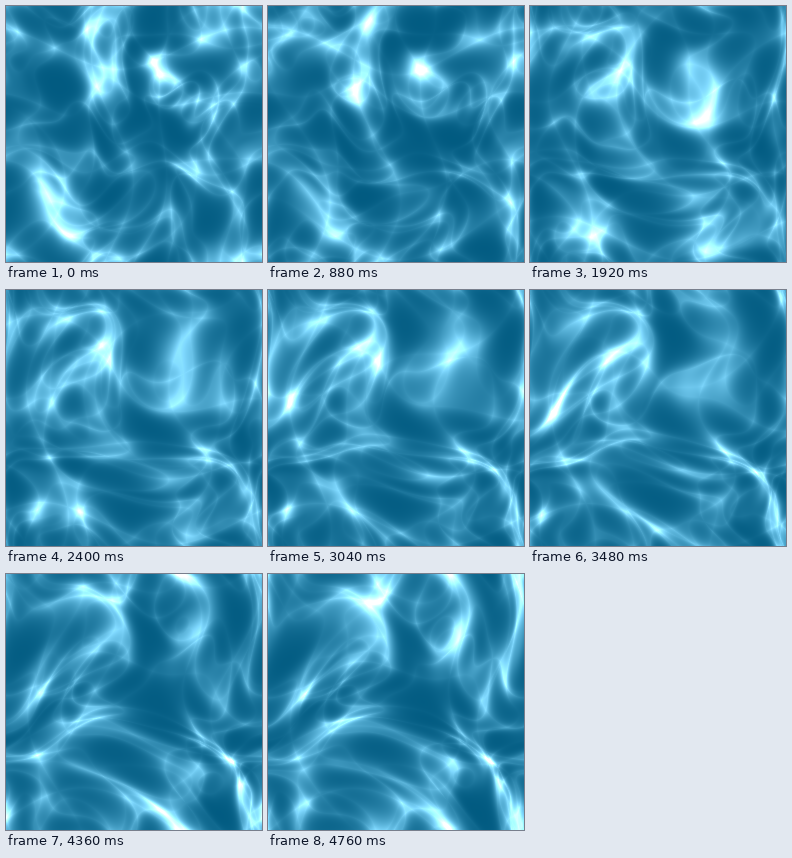
Recreate the animation shown at these times as an HTML page with a canvas. Size 256 px wide and 256 px high, loop 4800 ms.

```html
<!DOCTYPE html>
<html lang="en">
<head>
<meta charset="utf-8">
<title>Water caustics</title>
<style>
html, body { margin: 0; width: 100%; height: 100%; overflow: hidden; background: #005980; }
canvas { display: block; width: 256px; height: 256px; }
</style>
</head>
<body>
<canvas id="stage" width="256" height="256"></canvas>
<script>
const SIZE = 256;
const TAU = Math.PI * 2;
const QUARTER = Math.PI / 2;
const FRAME_MS = 40;
const FRAME_COUNT = 120;
const WAVES = 5;
const INTENSITY = 0.005;
const ORIGIN = -250;

const ctx = document.getElementById('stage').getContext('2d');
const image = ctx.createImageData(SIZE, SIZE);
const pixels = image.data;

// Sine lookup keeps the per-pixel work fast enough for smooth playback.
const STEPS = 1 << 15;
const MASK = STEPS - 1;
const SCALE = STEPS / TAU;
const sines = Float64Array.from({ length: STEPS }, (_, k) => Math.sin((k + 0.5) / SCALE));
const sin = a => sines[(a * SCALE) & MASK];
const cos = a => sines[((a + QUARTER) * SCALE) & MASK];

// Brightness (0..255) as a function of the summed wave terms.
const GLOW_STEPS = 1024;
const glow = Float64Array.from({ length: GLOW_STEPS * 5 }, (_, k) => {
  const c = 1.17 - Math.pow((1 + k / GLOW_STEPS) / WAVES, 1.4);
  return 255 * Math.pow(Math.abs(c), 8);
});

function shade(px, py, phases) {
  let x = px, y = py, sum = 0;
  for (let n = 0; n < WAVES; n++) {
    const t = phases[n];
    const nextX = px + cos(t - x) + sin(t + y);
    y = py + sin(t - y) + cos(t + x);
    x = nextX;
    const s = sin(x + t), c = cos(y + t);
    const a = px * c, b = py * s;
    sum += Math.abs(s * c) / (INTENSITY * Math.sqrt(a * a + b * b));
  }
  return glow[(sum * GLOW_STEPS) | 0];
}

function draw(frame) {
  const time = 23 + frame / FRAME_COUNT;
  const phases = Array.from({ length: WAVES }, (_, n) => time * (1 - 3.5 / (n + 1)));
  let k = 0;
  for (let row = 0; row < SIZE; row++) {
    const py = (row + 0.5) / SIZE * TAU + ORIGIN;
    for (let col = 0; col < SIZE; col++) {
      const px = (col + 0.5) / SIZE * TAU + ORIGIN;
      const light = shade(px, py, phases);
      pixels[k++] = light;
      pixels[k++] = light + 0.35 * 255;
      pixels[k++] = light + 0.5 * 255;
      pixels[k++] = 255;
    }
  }
  ctx.putImageData(image, 0, 0);
}

const start = performance.now();
let shown = 0;

function tick() {
  const elapsed = performance.now() - start;
  const frame = Math.floor(elapsed / FRAME_MS) % FRAME_COUNT;
  if (frame !== shown) {
    draw(frame);
    shown = frame;
  }
  requestAnimationFrame(tick);
}

draw(0);
requestAnimationFrame(tick);
</script>
</body>
</html>
```
